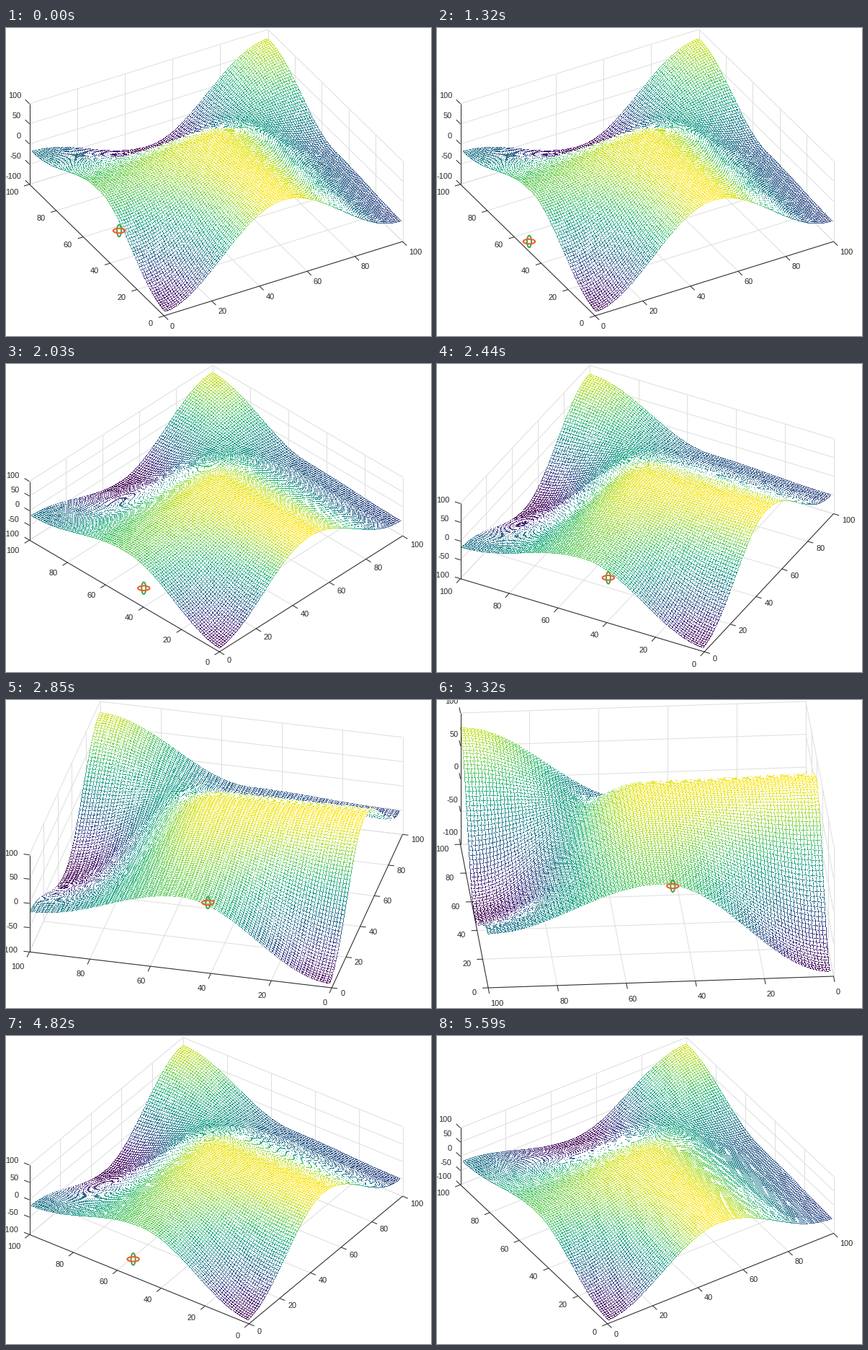
Write a matplotlib script that moves like this. It is 590 px wide and 427 px high and loops after 6.4 s.

```python
import numpy as np
import matplotlib.pyplot as plt
from matplotlib.animation import FuncAnimation
from matplotlib.collections import LineCollection
from matplotlib.patches import Ellipse

W, H, DPI = 590, 427, 128
PX = 72 / DPI                 # one pixel in points
STEP, LOOP = 40, 6400         # ms
BOX = 32.5, 550.5, 2, 399     # left, right, top, bottom of the plot
DARK, LIGHT = "#262626", "#dedede"

# The drag: time, azimuth and elevation where the hand changes course
START, PEAK, FAR, END = (29.45, 61.9), (47, 70.4), (99, 44.4), (33.05, 71.1)
DRAG = [(1470, *START), (2030, *PEAK), (2850, 77.2, 58.2),
        (3320, 94.6, 47.6), (3480, *FAR), (4050, *FAR),
        (4290, 84.5, 59), (5180, *END)]
LAG = 150                     # ms by which the view trails the pointer
REST = np.array([128, 296])   # pointer when the drag begins
PER_DEGREE = np.array([518 / 180, 396 / 180])


def ramp(t, start, stop):
    return np.clip((t - start) / (stop - start), 0, 1)


def view(t):
    time, az, el = zip(*DRAG)
    return np.array([np.interp(t, time, az), np.interp(t, time, el)])


def pointer(t):
    """Approach in two moves, lead the view, then leave downwards."""
    away = 1 - 0.14 * ramp(t, 0, 80) - 0.86 * ramp(t, 390, 520)
    turn = (view(t + LAG) - START) * PER_DEGREE
    leave = ramp(t, 5300, 5560)
    return REST + turn + away * np.array([29, -15]) + leave * np.array([10, 130])


# Height field: a 3 x 3 grid of heights blended with cosine weights
NODES = np.array([[-95, 47, -20], [91, 86, -97], [-52, -40, 77]])
SUB = 6                       # samples per mesh cell
side = np.linspace(1, 100, 99 * SUB + 1)
dist = side[:, None] / 50 - np.arange(3)
blend = np.where(abs(dist) < 1, (1 + np.cos(np.pi * dist)) / 2, 0)
height = blend @ NODES @ blend.T
gx, gy = np.meshgrid(side / 100, side / 100, indexing="ij")
gz = (height + 100) / 200
shade = (height - height.min()) / np.ptp(height)
colors = plt.get_cmap("viridis")(shade, bytes=True)


class Camera:
    """Orthographic view of the unit cube, stretched to fill BOX."""

    def __init__(self, az, el):
        a, e = np.radians([az, el])
        self.c, self.s = np.cos(a), np.sin(a)
        self.ce, self.se = np.cos(e), np.sin(e)
        left, right, top, bottom = BOX
        span = abs(self.c) + abs(self.s)
        self.kx = (right - left) / span
        self.ky = (bottom - top) / (span * self.se + self.ce)
        self.mid = (left + right) / 2, (top + bottom) / 2

    def project(self, x, y, z):
        x, y, z = x - 0.5, y - 0.5, z - 0.5
        u = x * self.c - y * self.s
        v = (x * self.s + y * self.c) * self.se + z * self.ce
        return self.mid[0] + u * self.kx, self.mid[1] - v * self.ky

    def depth(self, x, y, z):
        return z * self.se - (x * self.s + y * self.c) * self.ce


def rows(m):
    return m[::SUB]


def columns(m):
    return m[:, ::SUB].swapaxes(0, 1)


def mesh_image(cam):
    """Draw the mesh far to near, hiding lines behind the surface."""
    order = slice(None, None, -1), slice(None, None, -1 if cam.c > 0 else 1)
    x, y, z = gx[order], gy[order], gz[order]
    px, py = cam.project(x, y, z)
    cell = py.astype(int) * W + px.astype(int)
    near = cam.depth(x, y, z)
    front = np.full(W * H, -9.0)
    front[cell.ravel()] = near.ravel()
    img = np.zeros((W * H, 4), np.uint8)
    img[front > -9] = 255
    for pick in (rows, columns):
        u, v = pick(px), pick(py)
        flat = abs(np.diff(u)) >= abs(np.diff(v))
        # one pixel for each step along the line's main direction
        hop = np.where(flat, np.diff(np.rint(u)), np.diff(np.rint(v))) != 0
        spot = pick(cell)[:, 1:][hop]
        seen = pick(near)[:, 1:][hop] >= front[spot] - 0.004
        img[spot[seen]] = pick(colors[order])[:, 1:][hop][seen]
    return img.reshape(H, W, 4)


TICKS = np.arange(6) / 5
LEVELS = np.arange(5) / 4


def grid_lines(cam, yb):
    """Lines on the floor and on the walls x = 1 and y = yb."""
    ends = []
    for t in TICKS:
        ends += [((t, 0, 0), (t, 1, 0)), ((0, t, 0), (1, t, 0)),
                 ((t, yb, 0), (t, yb, 1)), ((1, t, 0), (1, t, 1))]
    for t in LEVELS:
        ends += [((0, yb, t), (1, yb, t)), ((1, 0, t), (1, 1, t))]
    return [[cam.project(*p), cam.project(*q)] for p, q in ends]


def direction(cam, vec):
    d = np.subtract(cam.project(*vec), cam.project(0, 0, 0))
    return d / np.hypot(*d)


fig = plt.figure(figsize=(W / DPI, H / DPI), dpi=DPI, facecolor="white")
ax = fig.add_axes([0, 0, 1, 1])
ax.axis("off")
mesh = ax.imshow(np.zeros((H, W, 4), np.uint8), extent=(0, W, H, 0),
                 interpolation="nearest", aspect="auto", zorder=2)
ax.set_xlim(0, W)
ax.set_ylim(H, 0)


def make_lines(color, zorder):
    lines = LineCollection([], colors=color, linewidths=PX, zorder=zorder)
    return ax.add_collection(lines, autolim=False)


def make_labels(values, va):
    return [ax.text(0, 0, str(v), va=va, color=DARK, zorder=4,
                    family="Liberation Sans", fontsize=11 * PX)
            for v in values]


grid, frame = make_lines(LIGHT, 1), make_lines(DARK, 3)
x_labels = make_labels(range(0, 101, 20), "top")
y_labels = make_labels(range(0, 101, 20), "top")
z_labels = make_labels(range(-100, 101, 50), "center")
rings = [ax.add_patch(Ellipse((0, 0), w, h, fill=False, edgecolor=color,
                              linewidth=2 * PX, zorder=5))
         for w, h, color in ((6, 16.5, "#43a84a"), (16.5, 6.5, "#f2592b"))]


def place_axis(cam, points, outward, labels, lines):
    """Add one axis with its ticks and move its labels."""
    spots = [np.array(cam.project(*p)) for p in points]
    d = direction(cam, outward)
    upright = labels is z_labels
    gap = 12 if d[0] > 0.5 else 16
    drop = np.array([0, 0 if upright else 1.3])
    lines.append([spots[0], spots[-1]])
    for spot, label in zip(spots, labels):
        lines.append([spot, spot + 8 * d])
        label.set_position(spot + gap * d + drop)
        label.set_ha("right" if d[0] < 0 or upright else "left")


def update(i):
    t = i * STEP
    cam = Camera(*view(t))
    turned = cam.c < 0
    y_back, y_front = (0, 1) if turned else (1, 0)
    mesh.set_data(mesh_image(cam))
    grid.set_segments(grid_lines(cam, y_back))

    lines = []
    place_axis(cam, [(v, y_front, 0) for v in TICKS],
               (0, 1 if turned else -1, 0), x_labels, lines)
    place_axis(cam, [(0, v, 0) for v in TICKS], (-1, 0, 0), y_labels, lines)
    place_axis(cam, [(int(turned), 1, v) for v in LEVELS],
               (1, 0, 0) if turned else (0, 1, 0), z_labels, lines)
    frame.set_segments(lines)

    for ring in rings:
        ring.center = tuple(pointer(t))
    return [mesh, grid, frame, *x_labels, *y_labels, *z_labels, *rings]


anim = FuncAnimation(fig, update, frames=LOOP // STEP, interval=STEP,
                     init_func=lambda: update(0), repeat=True,
                     repeat_delay=0, blit=False)
plt.show()
```
